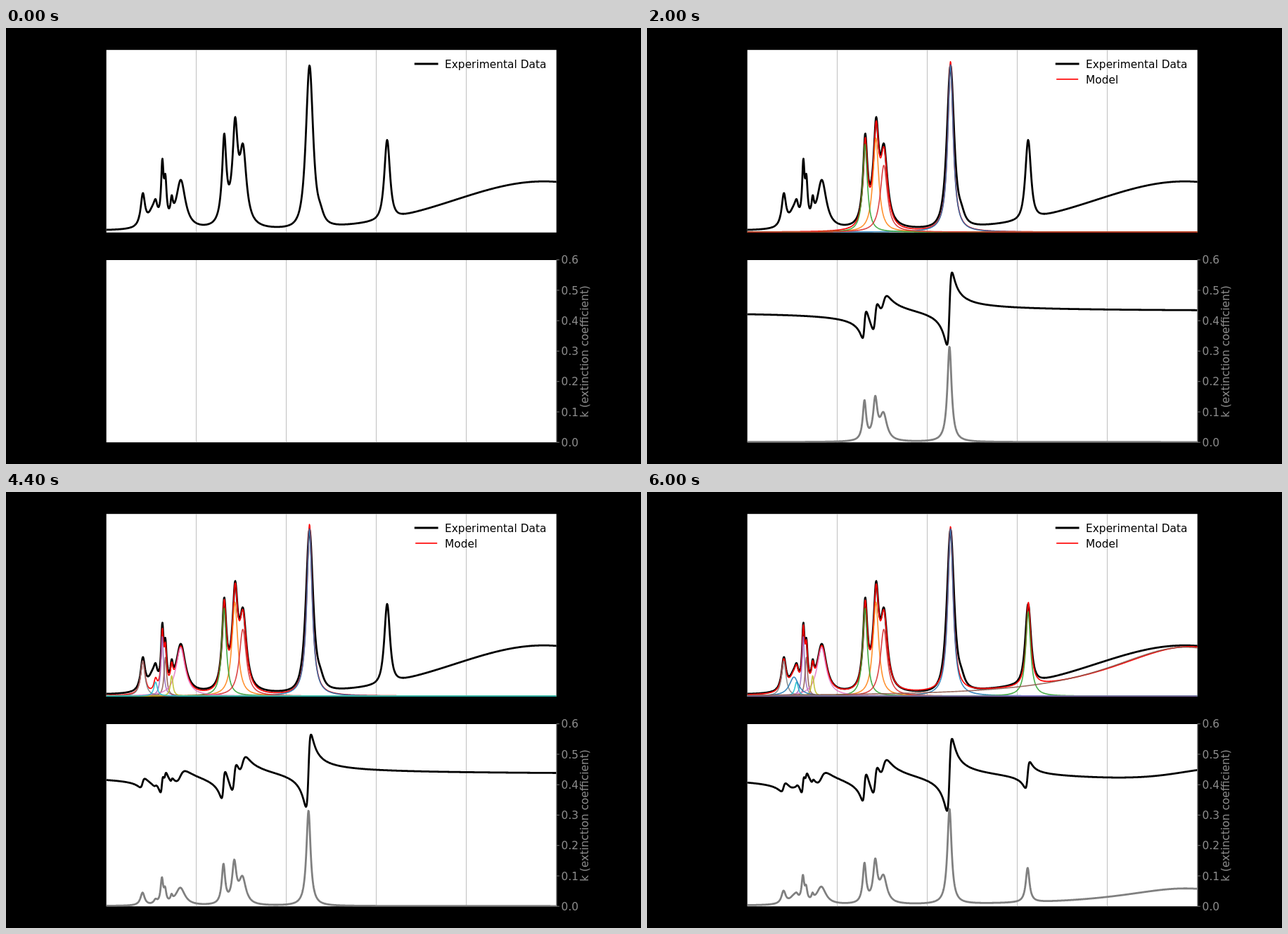
Recreate the animation shown at these times as an HTML page. Size 903x620 px, loop 6400 ms.

```html
<!DOCTYPE html>
<html lang="en">
<head>
<meta charset="utf-8">
<title>Oscillator model</title>
<style>
  html, body { margin: 0; width: 100%; height: 100%; overflow: hidden; background: #000; }
  svg { display: block; width: 903px; height: 620px; }
  text { font-family: "DejaVu Sans", sans-serif; font-size: 15.42px; }
  path { fill: none; stroke-linejoin: round; }
  .thick { stroke-width: 2.78; }
  .thin { stroke-width: 1.67; }
  .band { stroke-opacity: 0.85; }
</style>
</head>
<body>
<svg viewBox="0 0 903 620">
  <defs>
    <clipPath id="upper"><rect x="142.7" y="31" width="640" height="260"/></clipPath>
    <clipPath id="lower"><rect x="142.7" y="330" width="640" height="259.4"/></clipPath>
  </defs>
  <rect width="903" height="620" fill="#000"/>
  <rect x="142.7" y="31.2" width="640" height="259.6" fill="#fff"/>
  <rect x="142.7" y="330" width="640" height="259.2" fill="#fff"/>
  <g id="grid" stroke="#b0b0b0" stroke-width="0.8"></g>
  <g id="top" clip-path="url(#upper)"></g>
  <g id="bottom" clip-path="url(#lower)"></g>
  <path d="M783 329.5V589.5" stroke="#808080"/>
  <g id="axis" fill="#8c8c8c"></g>
  <text x="828.3" y="460" fill="#8c8c8c" text-anchor="middle" transform="rotate(-90 828.3 460)">k (extinction coefficient)</text>
  <path class="thick" d="M582.2 51H613.2" stroke="#000" stroke-linecap="square"/>
  <text x="624" y="56.7">Experimental Data</text>
  <g id="modelKey">
    <path class="thin" d="M582.2 72.8H613.2" stroke="#f00"/>
    <text x="624" y="78.5">Model</text>
  </g>
</svg>
<script>
const NS = "http://www.w3.org/2000/svg";
const byId = id => document.getElementById(id);
const LEFT = 142.5, RIGHT = 783;
const BASE = 290.2, K_ZERO = 588.8, N_BASE = 404.1, N_DRIFT = 0.2, N_PER_K = 0.76;
const STEP_MS = 400, STEPS = 16;
const NORM = 1.12;

const [blue, orange, green, red, purple, brown, pink, gray, olive, cyan] =
  "1f77b4 ff7f0e 2ca02c d62728 9467bd 8c564b e377c2 7f7f7f bcbd22 17becf"
    .split(" ").map(hex => "#" + hex);

// colour, centre, height, half-width, k height, k half-width, steepness
const oscillators = [
  [blue, 431.6, 238, 4.6, 135.5, 3.6],
  [orange, 325.4, 133.5, 5, 56, 3.6],
  [green, 310, 125, 4, 55, 2.9],
  [red, 336.8, 95, 6, 37, 6],
  [purple, 222.2, 85, 2.2, 35, 2.2],
  [brown, 226.6, 55, 2.2, 17, 2],
  [pink, 248.3, 69, 8, 25, 8],
  [gray, 194.5, 50, 3.8, 18, 3.6],
  [olive, 235.6, 29, 2.2, 8, 1.8],
  [cyan, 212.7, 20, 3, 6, 3],
  [blue, 209, 27, 8, 10, 7],
  [green, 542, 120, 4.2, 49, 3.2],
  [purple, 600, 0, 1, 0, 1],
  [brown, 766, 69.5, 167, 25, 115, 1.5]
].map(([color, x, h, w, kh, kw, p]) => ({
  color, band: [x, h, w, p], k: [x - h * 0.006, kh, kw]
}));

const peak = (x, [c, h, w, p = 1]) => h / (1 + ((x - c) / w) ** 2) ** p;
const disperse = (x, k) => N_PER_K * peak(x, k) * (x - k[0]) / k[2];
const sum = (list, fn) => list.reduce((total, item) => total + fn(item), 0);

// overlapping bands add slightly less than linearly; the index shift scales them
function blend(x, list) {
  const total = sum(list, o => peak(x, o.band) ** NORM) ** (1 / NORM);
  const shift = sum(list, o => o === oscillators[0] ? 0 : disperse(x, o.k));
  return total * (1 + shift / 238);
}

// the measured curve shares the left bands and has broader ones on the right
const leftBands = oscillators.slice(1, 11);
const rightBands = [
  [431.6, 229, 7.8, 1.5], [447, 13, 6], [542, 112, 6.1, 1.5], [765, 70, 816, 20]
];
const measured = x => BASE - 2 - blend(x, leftBands) - sum(rightBands, b => peak(x, b));

function plot(fn) {
  let d = "";
  for (let x = LEFT; x <= RIGHT; x += 0.5)
    d += (d ? "L" : "M") + x + " " + fn(x).toFixed(2);
  return d;
}

function add(parent, name, attrs) {
  const el = document.createElementNS(NS, name);
  for (const key in attrs) el.setAttribute(key, attrs[key]);
  return byId(parent).appendChild(el);
}

for (let i = 1; i < 5; i++) {
  const x = 142.5 + 128 * i;
  add("grid", "path", { d: `M${x} 31.2V290.8M${x} 330V589.2` });
}
for (let i = 0; i <= 6; i++) {
  const y = 589.2 - 43.25 * i;
  add("axis", "path", { d: `M783 ${y}h3.9`, stroke: "#808080", "stroke-width": 0.9 });
  add("axis", "text", { x: 789.6, y: y + 5.7 }).textContent = (i / 10).toFixed(1);
}

add("top", "path", { class: "thick", stroke: "#000", d: plot(measured) });
const model = add("top", "path", { class: "thin", stroke: "#f00" });
const bands = oscillators.map(o => add("top", "path", {
  class: "thin band", stroke: o.color, d: plot(x => BASE - peak(x, o.band))
}));
const index = add("bottom", "path", { class: "thick", stroke: "#000" });
const extinction = add("bottom", "path", { class: "thick", stroke: "#808080" });

const show = (el, on) => el.setAttribute("visibility", on ? "visible" : "hidden");

function draw(step) {
  const count = Math.max(0, step - 1), active = oscillators.slice(0, count);
  const level = N_BASE - N_DRIFT * count;
  [model, index, extinction, byId("modelKey")].forEach(el => show(el, step > 0));
  bands.forEach((el, i) => show(el, i < count));
  model.setAttribute("d", plot(x => BASE - blend(x, active)));
  index.setAttribute("d", plot(x => level - sum(active, o => disperse(x, o.k))));
  extinction.setAttribute("d", plot(x => K_ZERO - sum(active, o => peak(x, o.k))));
}

let shown = -1;
function tick() {
  const step = Math.floor(performance.now() / STEP_MS) % STEPS;
  if (step !== shown) draw(shown = step);
  requestAnimationFrame(tick);
}
tick();
</script>
</body>
</html>
```
